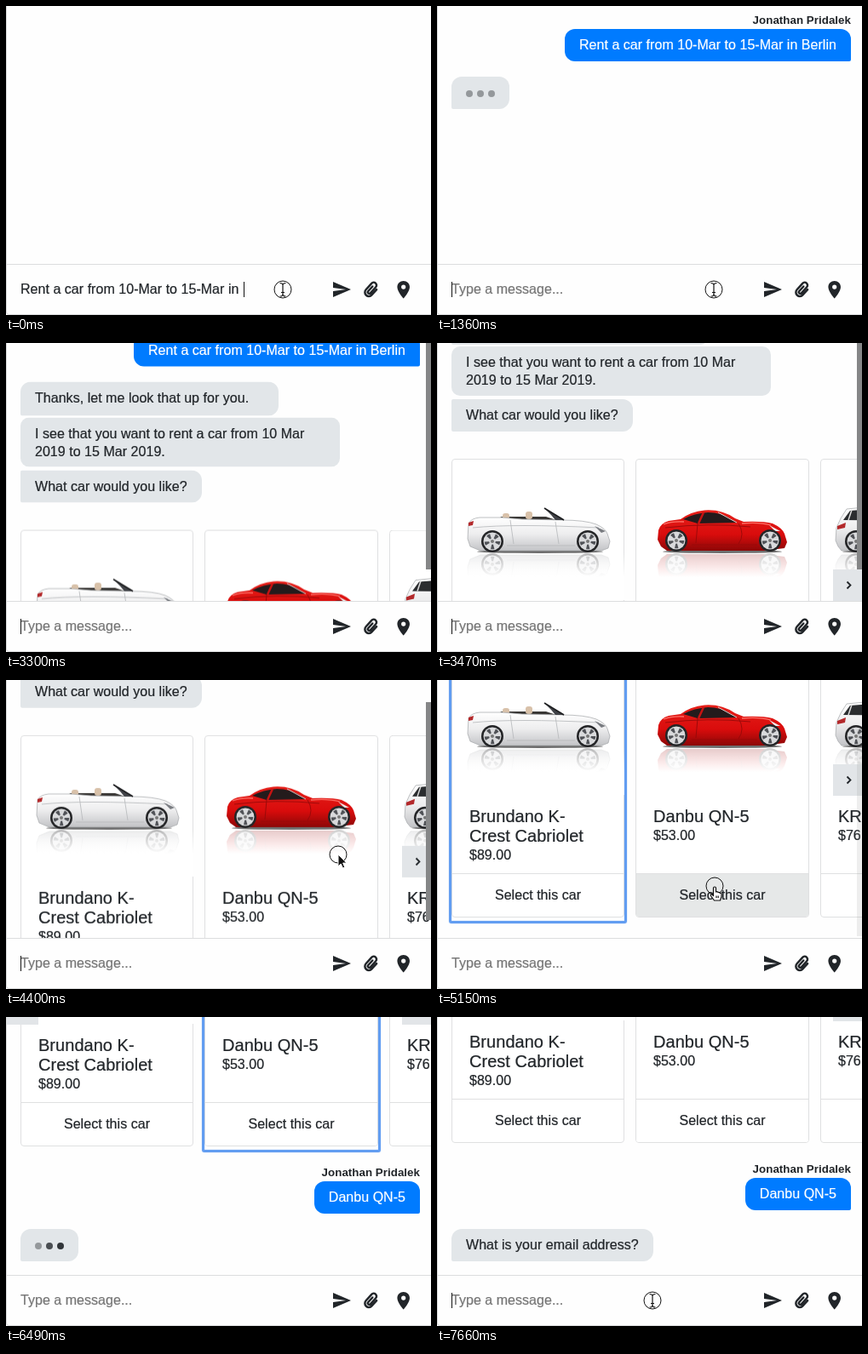
Animation, 499 px wide and 363 px high, one loop 8000 ms. Source, as an HTML page:

```html
<!DOCTYPE html>
<html lang="en">
<head>
<meta charset="utf-8">
<title>Car rental chat</title>
<style>
* { box-sizing: border-box; }
html, body { margin: 0; width: 100%; height: 100%; overflow: hidden; background: #fff; }
body { position: relative; font: 16px "Liberation Sans", Arial, sans-serif; letter-spacing: .035px; color: #212529;
  -webkit-text-stroke: .22px; white-space: nowrap; }
#stage { position: absolute; left: 0; top: 0; width: 499px; height: 363px; overflow: hidden; background: #fefefe; }
#frame { position: absolute; inset: 0 -4px 0 0; border: 1px solid #d9dadb; border-top: 0; border-bottom-left-radius: 4px; }
#view { position: absolute; left: 0; top: 0; width: 499px; height: 303px; overflow: hidden; }
#log { position: absolute; inset: 0; animation: scroll 8s infinite; }
#log > *, .abs { position: absolute; }

/* messages */
.name { right: 13px; font: bold 13.33px/16px "Liberation Sans", Arial, sans-serif; -webkit-text-stroke: 0; }
.bubble { height: 38px; padding: 0 17px; line-height: 38px; }
.me { right: 13px; background: #007bff; color: #fff; border-radius: 12px 12px 2px 12px; }
.bot { left: 17px; background: #e2e6e9; border-radius: 12px 12px 12px 2px; }
.mid { border-radius: 10px; }
.last { border-top-left-radius: 2px; }
.dots { width: 68px; }
.dots i { position: absolute; top: 16px; left: 17px; width: 8px; height: 8px; border-radius: 50%;
  background: #212529; opacity: .4; animation: pulse 8s ease infinite; animation-delay: calc(var(--at) + .333s); }
.dots i:nth-child(2) { left: 30px; animation-delay: calc(var(--at) + .667s); }
.dots i:nth-child(3) { left: 43px; animation-delay: calc(var(--at) + 1s); }

/* cards */
.card { top: 257px; width: 203px; height: 310px; border: 1px solid #dfe0e1; border-radius: 4px; background: #fff; }
.card svg { position: absolute; left: 0; top: 0; width: 202px; height: 165px; }
.card h3 { position: absolute; left: 20px; top: 179px; margin: 0; font-size: 20px; font-weight: 400; line-height: 23px; }
.card small { display: block; font-size: 16px; line-height: 22px; }
.card p { position: absolute; left: 0; right: 0; top: 257px; height: 51px; margin: 0; border-top: 1px solid #dfe0e1;
  text-align: center; line-height: 50px; border-radius: 0 0 3px 3px; }
.ring { position: absolute; inset: -4px -4px -8px; border: 3px solid #629df1; border-radius: 3px;
  box-shadow: 0 0 1px #629df1, inset 0 0 1px #629df1; opacity: 0; }
.arrow { top: 387px; height: 37px; background: #e2e5e8; }

/* composer */
#bar { position: absolute; left: 1px; right: 0; top: 303px; height: 59px; border-top: 1px solid #dcddde; }
.line { position: absolute; left: 17px; top: 323px; height: 20px; line-height: 20px; }
#draft { white-space: pre; }
#draft b { font-weight: 400; font-size: 0; animation: key 8s step-end infinite; }
.caret { display: inline-block; width: 1px; height: 18px; background: #111; vertical-align: -4px; }
#draft .caret { margin-left: 1px; }
#icons, #mouse { position: absolute; left: 0; top: 0; overflow: visible; }
#thumb { position: absolute; left: 493px; width: 6px; background: #858687; }

/* on and off */
.on { opacity: 0; animation: 8s step-end infinite; }
#draft { animation: draft 8s step-end infinite; }
#draft .caret { animation: draftCaret 8s step-end infinite; }
#hint { color: #757575; animation-name: sent; }
#caret { animation-name: caret; }
.sent { animation-name: sent; }
.wait1 { animation-name: wait1; }
.reply { animation-name: reply; }
.picked { animation-name: picked; }
.wait2 { animation-name: wait2; }
.ask { animation-name: ask; }
.ring1 { animation-name: ring1; }
.ring2, .prev { animation-name: ring2; }
#pick { animation: hover 8s step-end infinite; }
#thumb { animation: thumb 8s infinite linear; }
#mouse { animation: move 8s infinite ease-in-out; }
#beam { animation-name: beam; }
#hand { animation-name: hand; }
#point { animation-name: point; }

@keyframes key { 0% { font-size: 16px } 50%, 100% { font-size: 0 } }
@keyframes draft { 0% { opacity: 1 } 17%, 100% { opacity: 0 } }
@keyframes draftCaret { 0% { opacity: 1 } 4.5% { opacity: 0 } 5.25%, 100% { opacity: 1 } }
@keyframes sent { 0% { opacity: 0 } 17%, 100% { opacity: 1 } }
@keyframes caret {
  0%, 23.25%, 34.5%, 47%, 59.5% { opacity: 0 }
  17%, 28.5%, 40.6%, 53.25%, 95%, 100% { opacity: 1 }
}
@keyframes wait1 { 0%, 41%, 100% { opacity: 0 } 17% { opacity: 1 } }
@keyframes reply { 0% { opacity: 0 } 41%, 100% { opacity: 1 } }
@keyframes picked { 0% { opacity: 0 } 65.1%, 100% { opacity: 1 } }
@keyframes wait2 { 0%, 83.95%, 100% { opacity: 0 } 65.1% { opacity: 1 } }
@keyframes ask { 0% { opacity: 0 } 83.95%, 100% { opacity: 1 } }
@keyframes ring1 { 0%, 65.1%, 100% { opacity: 0 } 63.6% { opacity: 1 } }
@keyframes ring2 { 0%, 95%, 100% { opacity: 0 } 65.1% { opacity: 1 } }
@keyframes hover { 0%, 66.5%, 100% { background: #fff } 60.5% { background: #e6e8e8 } }
@keyframes pulse { 0%, 12.5% { opacity: .4 } 6.25%, 18.75% { opacity: 1 } 25%, 100% { opacity: .4 } }
@keyframes scroll {
  0%, 40.75% { transform: none; animation-timing-function: ease-out }
  43.3%, 52.5% { transform: translateY(-121px); animation-timing-function: ease-in-out }
  58%, 65.1% { transform: translateY(-288px); animation-timing-function: ease-out }
  68.7%, 83.9% { transform: translateY(-415px); animation-timing-function: step-end }
  83.95%, 100% { transform: translateY(-419px) }
}
@keyframes thumb {
  0%, 41% { opacity: 0; top: 0; height: 266px }
  41.1%, 52.5% { opacity: 1; top: 0; height: 266px }
  58%, 61.5% { opacity: 1; top: 58px; height: 243px }
  64.3%, 65% { opacity: .14 }
  65.2%, 70% { opacity: 1 }
  77%, 83.9% { opacity: 0 }
  84%, 90.7% { opacity: 1 }
  94.5%, 100% { opacity: 0; top: 58px; height: 243px }
}
@keyframes move {
  0%, 21% { transform: translate(325px, 333px) }
  26% { transform: translate(345px, 344px) }
  31% { transform: translate(368px, 331px) }
  36% { transform: translate(430px, 280px) }
  39.4%, 44% { transform: translate(518px, 215px) }
  48.5% { transform: translate(518px, 347px) }
  52.5%, 58% { transform: translate(390px, 205px) }
  62.5%, 69.2% { transform: translate(326px, 242px) }
  74% { transform: translate(420px, 305px) }
  78.5%, 84% { transform: translate(518px, 328px) }
  88%, 90.5% { transform: translate(285px, 380px) }
  94%, 100% { transform: translate(253px, 333px) }
}
@keyframes beam { 0%, 92%, 100% { opacity: 1 } 31% { opacity: 0 } }
@keyframes hand { 0%, 68%, 100% { opacity: 0 } 60.5% { opacity: 1 } }
@keyframes point { 0%, 60.5%, 92%, 100% { opacity: 0 } 31%, 68% { opacity: 1 } }
</style>
</head>
<body>
<div id="stage">
  <div id="frame"></div>
  <div id="view">
    <div id="log">
      <div class="name on sent" style="top:9px">Jonathan Pridalek</div>
      <div class="bubble me on sent" style="top:27px">Rent a car from 10-Mar to 15-Mar in Berlin</div>
      <div class="bubble bot dots on wait1" style="top:83px;--at:1.32s"><i></i><i></i><i></i></div>

      <div class="bubble bot on reply" style="top:83px;width:303px;height:40px">Thanks, let me look that up for you.</div>
      <div class="bubble bot mid on reply" style="top:125px;width:375px;height:58px;padding-top:8px;line-height:21px">I see that you want to rent a car from 10 Mar<br>2019 to 15 Mar 2019.</div>
      <div class="bubble bot last on reply" style="top:187px">What car would you like?</div>

      <div class="card on reply" style="left:17px">
        <svg viewBox="18 137 202 165">
          <defs>
            <linearGradient id="silver" x2="0" y2="1"><stop stop-color="#fff"/><stop offset=".5" stop-color="#ededee"/><stop offset="1" stop-color="#c3c4c7"/></linearGradient>
            <linearGradient id="red" x2="0" y2="1"><stop stop-color="#e6201a"/><stop offset=".6" stop-color="#d90c0c"/><stop offset="1" stop-color="#8c0707"/></linearGradient>
            <linearGradient id="fade" x2="0" y2="1"><stop stop-color="#fff" stop-opacity="0"/><stop offset=".52" stop-color="#fff"/></linearGradient>
            <g id="wheel">
              <circle r="13" fill="#242527"/><circle r="10.5" fill="#d9dadc"/>
              <circle r="6.500" fill="none" stroke="#505257" stroke-width="5.500" stroke-dasharray="3.200 4.970"/><circle r="2" fill="#777"/>
            </g>
            <g id="open">
              <path d="M70 207L76 204H128L140 208z" fill="#393735"/>
              <rect x="77" y="200" width="8" height="7" rx="3" fill="#d8c1a9"/><rect x="104" y="198" width="8" height="9" rx="3" fill="#d8c1a9"/>
              <path d="M39 239L36 230 37 212Q40 206 50 205L76 205 100 207 146 208Q174 208 187 213 198 218 200 224L203 233 201 241 193 244H51z" fill="url(#silver)" stroke="#a3a5a8" stroke-width=".7"/>
              <path d="M126 194L148 208H139L134 202z" fill="#404247"/>
              <path d="M126 194L149 208" stroke="#1c1d1f" stroke-width="1.700"/>
              <path d="M42 217Q90 212 190 217M82 238H162M86 208L90 236M139 210L143 236" fill="none" stroke="#b4b6b9" stroke-width=".8"/>
              <path d="M185 215L198 221 193 223z" fill="#787b80"/><path d="M37 211L43 209 42 214 37 215z" fill="#b3292b"/>
              <use href="#wheel" x="65" y="233"/><use href="#wheel" x="177" y="233"/>
            </g>
          </defs>
          <use href="#open" transform="matrix(1 0 0 -1 0 493)" opacity=".33"/>
          <rect x="18" y="246" width="202" height="56" fill="url(#fade)"/>
          <ellipse cx="121" cy="245" rx="74" ry="2" fill="#333" opacity=".7"/>
          <use href="#open"/>
        </svg>
        <h3>Brundano K-<br>Crest Cabriolet<small>$89.00</small></h3>
        <p>Select this car</p>
        <div class="ring on ring1"></div>
      </div>

      <div class="card on reply" style="left:233px;width:204px">
        <svg viewBox="234 137 202 165">
          <defs>
            <g id="coupe">
              <path d="M263 239L259 231 260 220Q262 212 272 209L286 207Q298 198 314 196.500 334 195 350 206L360 210Q382 209 394 212 405 217 408 224L411 234 408 241 384 244H270z" fill="url(#red)"/>
              <path d="M289 207Q302 200 318 199 334 199 345 207L352 211 306 212z" fill="#241b1c"/>
              <path d="M313 199L307 212" stroke="#c71312" stroke-width="2.500"/>
              <path d="M330 199L352 211" stroke="#d8d0d0" stroke-width="1"/>
              <path d="M268 217Q318 211 368 216M299 237H376M306 212L304 235M354 212Q362 225 354 236" fill="none" stroke="#960909" stroke-width=".9"/>
              <path d="M266 213Q276 209 290 210M358 212Q378 210 392 214" fill="none" stroke="#ff7168" stroke-width="1.300"/>
              <path d="M390 214L403 221 397 221z" fill="#eee"/>
              <use href="#wheel" x="281" y="232"/><use href="#wheel" x="391" y="232"/>
            </g>
          </defs>
          <use href="#coupe" transform="matrix(1 0 0 -1 0 492)" opacity=".22"/>
          <rect x="234" y="246" width="202" height="56" fill="url(#fade)"/>
          <ellipse cx="335" cy="245" rx="70" ry="2" fill="#333" opacity=".7"/>
          <use href="#coupe"/>
        </svg>
        <h3>Danbu QN-5<small>$53.00</small></h3>
        <p id="pick">Select this car</p>
        <div class="ring on ring2"></div>
      </div>

      <div class="card on reply" style="left:450px">
        <svg viewBox="451 137 202 165">
          <defs>
            <g id="wagon">
              <path d="M471 239L468 232 469 217 474 206 481 195Q520 190 560 195L590 209 625 215 632 238 622 244H475z" fill="url(#silver)" stroke="#a3a5a8" stroke-width=".7"/>
              <path d="M477 208L485 197Q525 193 556 197L578 209z" fill="#2b2d2f"/>
              <path d="M487 196L483 208" stroke="#ddd" stroke-width="1.500"/>
              <path d="M470 215L480 211 479 217 470 219z" fill="#b3292b"/>
              <use href="#wheel" x="492" y="233"/><use href="#wheel" x="603" y="233"/>
            </g>
          </defs>
          <use href="#wagon" transform="matrix(1 0 0 -1 0 493)" opacity=".33"/>
          <rect x="451" y="246" width="202" height="56" fill="url(#fade)"/>
          <ellipse cx="550" cy="245" rx="74" ry="2" fill="#333" opacity=".7"/>
          <use href="#wagon"/>
        </svg>
        <h3>KRL Q4<small>$76.00</small></h3>
        <p>Select this car</p>
      </div>

      <div class="arrow on prev" style="left:1px;width:37px"></div>
      <div class="arrow on reply" style="left:465px;width:34px">
        <svg width="34" height="37"><path d="M16.500 14.500L20.500 18.500 16.500 22.500" fill="none" stroke="#212529" stroke-width="1.800"/></svg>
      </div>

      <div class="name on picked" style="top:590px">Jonathan Pridalek</div>
      <div class="bubble me on picked" style="top:608px">Danbu QN-5</div>
      <div class="bubble bot dots on wait2" style="top:664px;--at:5.21s"><i></i><i></i><i></i></div>
      <div class="bubble bot on ask" style="top:668px">What is your email address?</div>
    </div>
    <div id="thumb"></div>
  </div>

  <div id="bar"></div>
  <div id="draft" class="line">Rent a car from 10-Mar to 15-Mar in <b style="animation-delay:.42s">B</b><b style="animation-delay:.59s">e</b><b style="animation-delay:.69s">r</b><b style="animation-delay:.79s">l</b><b style="animation-delay:.89s">i</b><b style="animation-delay:1s">n</b><span class="caret"></span></div>
  <div id="hint" class="line on">Type a message...</div>
  <div id="caret" class="caret abs on" style="left:17px;top:324px"></div>

  <svg id="icons" width="499" height="363" fill="#212529">
    <path transform="translate(382 321)" d="M2 21L23 12 2 3V10L17 12 2 14z"/>
    <path transform="translate(429 333) rotate(42)" fill="none" stroke="#212529" stroke-width="2.500" stroke-linecap="round"
      d="M4.600 -4V4.500A4.600 4.600 0 0 1 -4.600 4.500V-5.500A3.300 3.300 0 0 1 2 -5.500V4A1.700 1.700 0 0 1 -1.400 4V-3.500"/>
    <path transform="translate(454.700 321)" fill-rule="evenodd"
      d="M12 2C8 2 4.700 5.100 4.700 9.200 4.700 14.500 12 22.500 12 22.500S19.300 14.500 19.300 9.200C19.300 5.100 16 2 12 2zM12 11.700A2.600 2.600 0 1 1 12 6.500 2.600 2.600 0 0 1 12 11.700z"/>
  </svg>

  <svg id="mouse" width="1" height="1" fill="none" stroke="#111">
    <circle r="10"/>
    <path id="beam" class="on" d="M-3.500 -7.500Q0 -7.500 0 -5Q0 -7.500 3.500 -7.500M0 -5V6M-3.500 8Q0 8 0 5.500Q0 8 3.500 8M-2 3.500H2" stroke-width="1.200"/>
    <path id="hand" class="on" fill="#fff" stroke-linejoin="round" stroke-width="1.200"
      d="M-1.500 9V2.500Q-1.500 1 0 1T1.500 2.500V7Q3 6 4 7.500 5.500 6.800 6.200 8.300 8 8 8 10V12.500L6.500 17H-.500L-4.500 11.500Q-5 9.500 -3.500 9.500L-1.500 11.500zM2 11.500V14M4.200 11.500V14"/>
    <path id="point" class="on" fill="#111" stroke="#fff" d="M0 0V14L3.200 11 5.500 16 7.800 15 5.600 10H10z"/>
  </svg>
</div>
</body>
</html>
```
